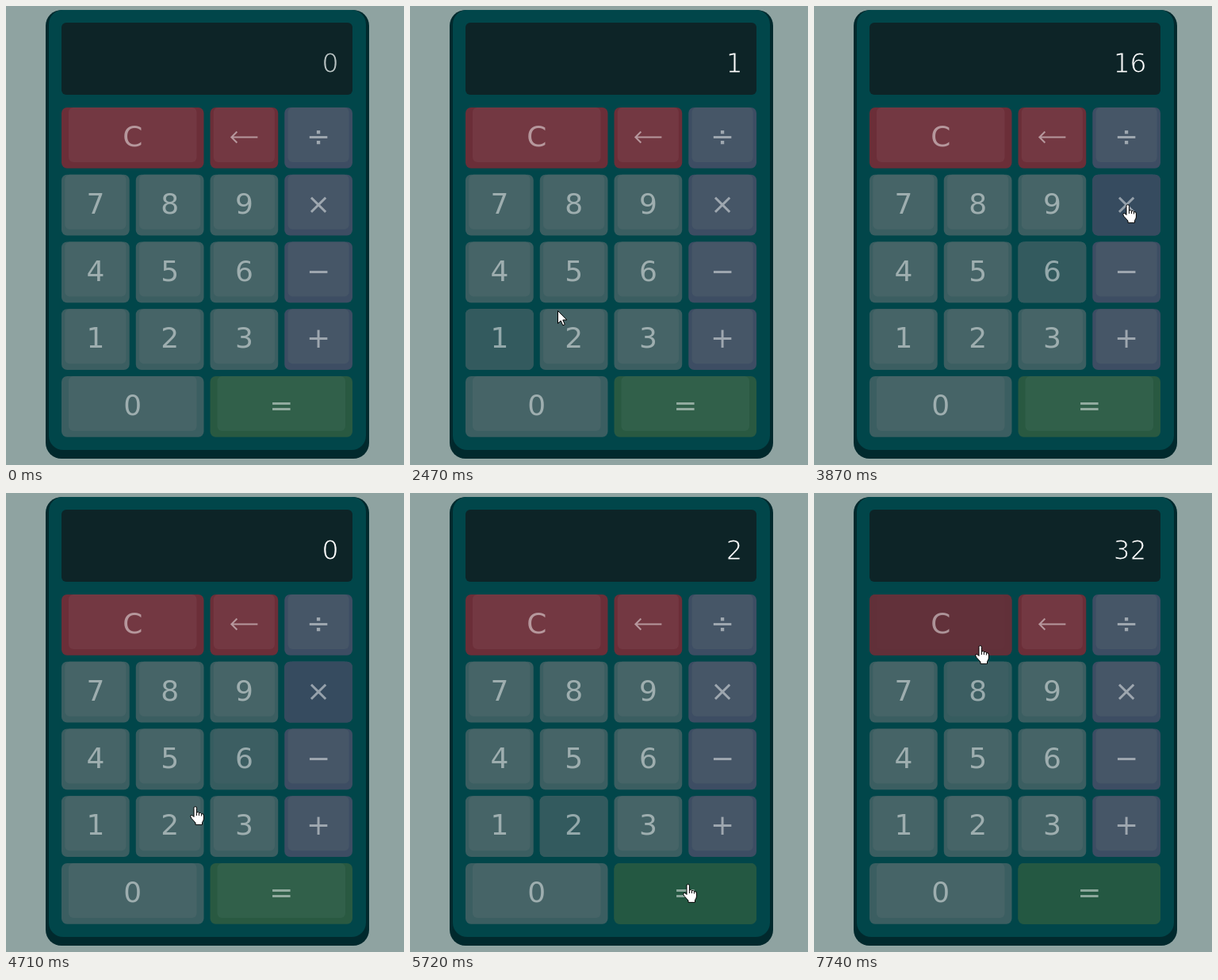
Write an HTML page that moves like this. It is 502 by 579 pixels and loops after 8000 ms.

```html
<!DOCTYPE html>
<html lang="en">
<head>
<meta charset="utf-8">
<title>Calculator</title>
<style>
  html, body { margin: 0; width: 100%; height: 100%; overflow: hidden; background: #8fa3a1; }
  svg { display: block; width: 100vw; height: 100vh; }
  .label { font: 36px "DejaVu Sans", sans-serif; text-anchor: middle; fill: #fff; fill-opacity: .48; }
  .back { fill: none; stroke: #fff; stroke-opacity: .48; stroke-width: 2; }
  /* A stroke in the screen colour slims the digits. */
  #readout { font: 33px "DejaVu Sans", sans-serif; text-anchor: end; stroke: #0d2427; stroke-width: 1.2; }
  .pointer { fill: #fff; stroke: #000; stroke-width: 1; stroke-linejoin: round; }
</style>
</head>
<body>
<svg viewBox="0 0 502 579" preserveAspectRatio="none">
  <rect x="50" y="5" width="408" height="566" rx="20" fill="#01292d"/>
  <rect x="54" y="5" width="400" height="555" rx="18" fill="#01464a"/>
  <rect x="70" y="21" width="367" height="91" rx="6" fill="#0d2427"/>
  <text id="readout" x="419.5" y="84"></text>
  <g id="keys"></g>
  <g id="cursor">
    <path id="arrow" class="pointer" d="M.5 .5V16.5L4.2 13L6.8 18.8L9.3 17.7L6.8 12H11.8Z"/>
    <g id="hand" class="pointer" transform="translate(-6 0)">
      <path d="M5 2.3Q5 .6 6.7 .6Q8.4 .6 8.4 2.3V8Q10.5 6.7 11.4 8.6Q13.5 7.6 14.4 9.6Q17.4 9 17.4 12V16Q17.4 18 15.5 20.5V23.4H7V21L2 15.5Q.2 13 1 11.8Q2.4 10.8 4 12.5L5 13.5Z"/>
      <path fill="none" d="M8.4 8V12M11.4 8.6V12M14.4 9.6V12.5"/>
    </g>
  </g>
</svg>
<script>
const LOOP = 8000, STEP = 76.5, TICK = 10, RISE = 80, FALL = 150;
const byId = id => document.getElementById(id);

// Each tone: edge, cap, flat (hovered or focused).
const tones = {
  red:   ['#6b2e38', '#733842', '#60303a'],
  grey:  ['#3b5e61', '#466467', '#335a5e'],
  blue:  ['#3d4d63', '#465667', '#364b5f'],
  green: ['#295941', '#31604a', '#245842']
};

const keys = [];
const addKey = (label, col, row, tone = 'grey', span = 1) => keys.push({
  label, tone, x: 70 + col * 93.75, y: 128 + row * 84.75,
  w: span * 93.75 - 8, h: 76.75
});
addKey('C', 0, 0, 'red', 2);
addKey('←', 2, 0, 'red');
['789', '456', '123'].forEach((digits, row) =>
  [...digits].forEach((digit, col) => addKey(digit, col, row + 1)));
[...'÷×−+'].forEach((sign, row) => addKey(sign, 3, row, 'blue'));
addKey('0', 0, 4, 'grey', 2);
addKey('=', 2, 4, 'green', 2);

function make(parent, name, attrs) {
  const node = document.createElementNS('http://www.w3.org/2000/svg', name);
  for (const key in attrs) node.setAttribute(key, attrs[key]);
  return parent.appendChild(node);
}

for (const key of keys) {
  const { x, y, w, h, label } = key, [edge, cap, flat] = tones[key.tone];
  const group = byId('keys'), mid = x + w / 2;
  make(group, 'rect', { x, y, width: w, height: h, rx: 7, fill: edge });
  make(group, 'rect', { x: x + w * .05, y, width: w * .9, height: h * .9, rx: 6, fill: cap });
  key.cover = make(group, 'rect', { x, y, width: w, height: h, rx: 7, fill: flat });
  if (label === '←') {
    make(group, 'path', { class: 'back', d: `M${mid + 17} 165.5H${mid - 16}M${mid - 9} 158.5L${mid - 16} 165.5L${mid - 9} 172.5` });
  } else {
    make(group, 'text', { class: 'label', x: mid, y: y + 49 }).textContent = label;
  }
}

// The pointer travels in discrete steps that slow towards the goal.
const entry = { x: 205, y: 620 };
const moves = [
  { at: 1460, steps: 6, x: 116, y: 400, power: 1.5 },
  { at: 2470, steps: 5, x: 300, y: 322, power: 2.14, bend: 15 },
  { at: 2855, steps: 1, x: 300, y: 339 },
  { at: 3490, steps: 5, x: 393, y: 241, power: 1.8 },
  { at: 3868, steps: 1, x: 395, y: 250 },
  { at: 4480, steps: 6, x: 221, y: 411, power: 2.1 },
  { at: 5340, steps: 6, x: 355, y: 496, power: 1.8 },
  { at: 7130, steps: 9, x: 196, y: 166, power: 1.15 }
];

// Focus follows the press; the readout follows the release.
const clicks = [
  { down: 2070, up: 2150, key: '1', shows: '1' },
  { down: 3090, up: 3165, key: '6', shows: '16' },
  { down: 4100, up: 4180, key: '×', shows: '0' },
  { down: 4960, up: 5035, key: '2', shows: '2' },
  { down: 6430, up: 6505, key: '=', shows: '32' }
];

function pointerAt(t) {
  const index = moves.findLastIndex(move => t >= move.at);
  if (index < 0) return null;
  const { at, steps, x, y, power = 1, bend = 0 } = moves[index];
  const from = moves[index - 1] || entry;
  const u = Math.min(1, (Math.floor((t - at) / STEP) + 1) / steps);
  const p = 1 - (1 - u) ** power;
  return {
    x: Math.round(from.x + (x - from.x) * p),
    y: Math.round(from.y + (y - from.y) * p + bend * Math.sin(Math.PI * p))
  };
}

const keyUnder = point => point && keys.find(({ x, y, w, h }) =>
  point.x > x + 5 && point.x < x + w - 5 && point.y > y + 5 && point.y < y + h - 5);

// Flatness of every key per tick, so a picture depends on its time alone.
const history = [];
let levels = keys.map(() => 0);
for (let t = 0; t <= LOOP; t += TICK) {
  const hovered = keyUnder(pointerAt(t));
  const focused = clicks.findLast(click => t >= click.down)?.key;
  history.push(levels);
  levels = levels.map((level, i) => {
    const active = keys[i] === hovered || keys[i].label === focused;
    return Math.max(0, Math.min(1, level + (active ? TICK / RISE : -TICK / FALL)));
  });
}

function draw(t) {
  const frame = history[Math.floor(t / TICK)];
  keys.forEach((key, i) => key.cover.setAttribute('opacity', frame[i]));

  const last = clicks.findLast(click => t >= click.up);
  byId('readout').textContent = last ? last.shows : '0';
  byId('readout').setAttribute('fill', last ? '#fff' : '#b9c3c3');

  const point = pointerAt(t), over = keyUnder(point);
  byId('cursor').style.display = point ? '' : 'none';
  if (!point) return;
  byId('cursor').setAttribute('transform', `translate(${point.x} ${point.y})`);
  byId('arrow').style.display = over ? 'none' : '';
  byId('hand').style.display = over ? '' : 'none';
}

const start = performance.now();
function loop() {
  draw((performance.now() - start) % LOOP);
  requestAnimationFrame(loop);
}
loop();
</script>
</body>
</html>
```
